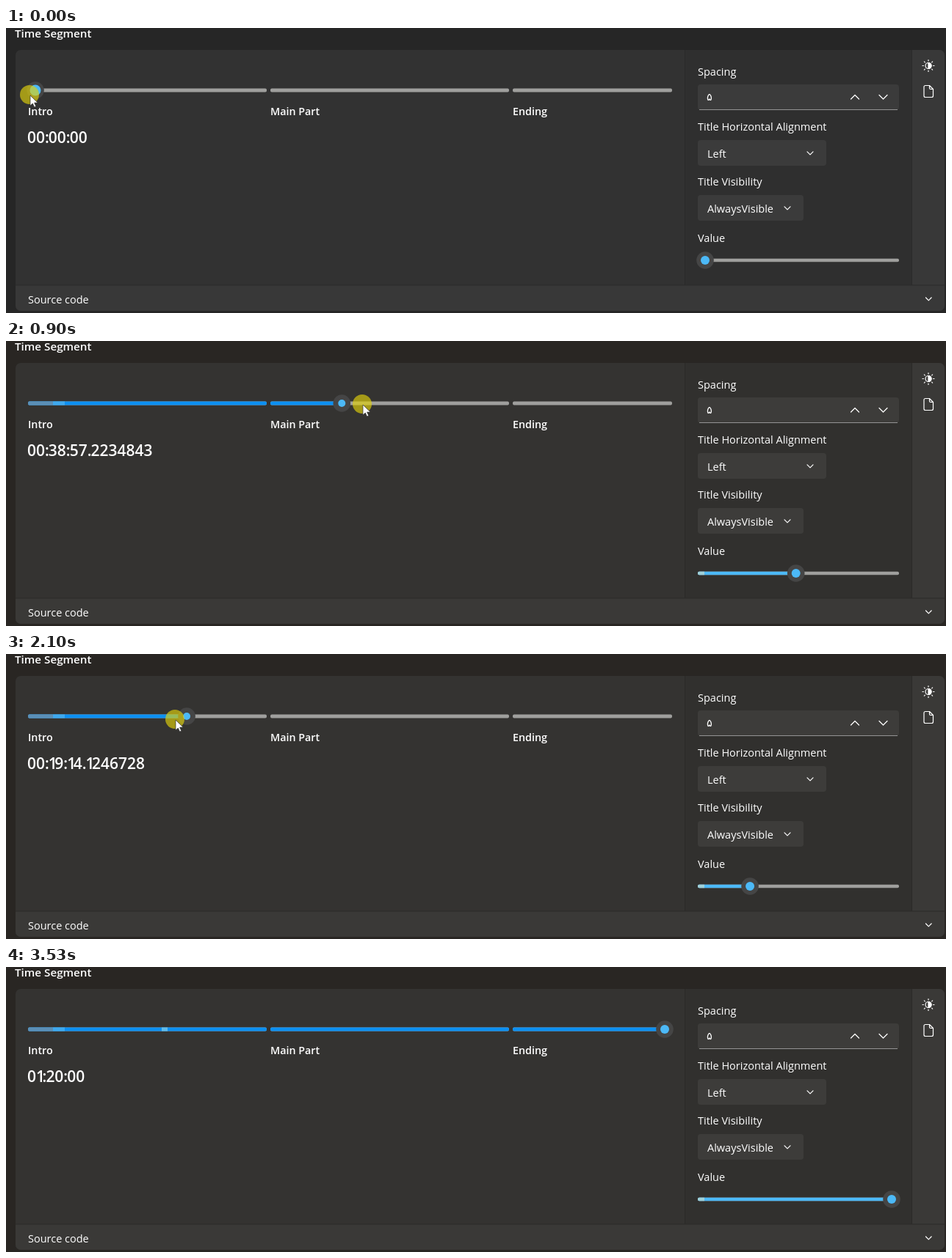
Recreate the animation shown at these times as an HTML page. Size 1280 px wide and 389 px high, loop 3.66 s.

```html
<!DOCTYPE html>
<html lang="en">
<head>
<meta charset="utf-8">
<title>Time Segment</title>
<style>
  html, body { margin: 0; width: 100%; height: 100%; overflow: hidden; background: #262626; }
  svg { display: block; width: 1280px; height: 389px; --bg: #262626; --card: #323232; --side: #2f2f2f; --strip: #383838; --box: #3b3b3b; --line: #2a2a2a; }
  svg.warm { --bg: #292623; --card: #343331; --side: #31302e; --strip: #3a3937; --box: #3d3c3a; --line: #2b2a28; }
  text { font: 14.5px "Open Sans", "Noto Sans", sans-serif; fill: #fff; white-space: pre; }
  .bold { font-weight: 600; font-size: 14.3px; }
  #clock { font-weight: 600; font-size: 21px; }
  .one { letter-spacing: -3.5px; }
  .dot { letter-spacing: -.9px; }
  .icon { fill: none; stroke: #fff; stroke-width: 1.2; stroke-linecap: round; stroke-linejoin: round; }
  .track { fill: #9f9f9d; }
  .ring { fill: #454545; }
  .accent { fill: #4cb9f7; }
</style>
</head>
<body>
<svg id="stage" viewBox="0 0 1280 389">
  <defs>
    <clipPath id="card"><rect x="13" y="30" width="1265" height="356" rx="7"/></clipPath>
    <clipPath id="bars">
      <rect x="30" y="82.6" width="325" height="4.8" rx="2"/>
      <rect x="360" y="82.6" width="325" height="4.8" rx="2"/>
      <rect x="690" y="82.6" width="217" height="4.8" rx="2"/>
    </clipPath>
    <clipPath id="valueBar"><rect x="942" y="314.8" width="274" height="4.4" rx="2"/></clipPath>
  </defs>

  <rect width="1280" height="389" fill="var(--bg)"/>
  <g clip-path="url(#card)">
    <rect x="13" y="30" width="1265" height="356" fill="var(--card)"/>
    <rect x="924" y="30" width="310" height="321" fill="var(--side)"/>
    <rect x="1234" y="30" width="44" height="321" fill="var(--strip)"/>
    <rect x="13" y="351" width="1265" height="35" fill="var(--strip)"/>
    <path d="M924.5 30V351M1233.5 30V351M13 351H1278" fill="none" stroke="var(--line)"/>
  </g>

  <text class="bold" x="12" y="12.5" style="font-size:15.2px">Time Segment</text>
  <text class="bold" x="30" y="119">Intro</text>
  <text class="bold" x="360" y="119">Main Part</text>
  <text class="bold" x="690" y="119">Ending</text>
  <text id="clock" x="29" y="157"></text>
  <text x="30" y="376">Source code</text>

  <g fill="var(--box)">
    <rect x="942" y="77" width="274" height="35" rx="4"/>
    <rect x="942" y="153" width="175" height="35" rx="4"/>
    <rect x="942" y="228" width="144" height="35" rx="4"/>
  </g>
  <path d="M944 111.5H1214" stroke="#949494"/>
  <text x="942" y="65">Spacing</text>
  <text x="954" y="99" style="font-family:'DejaVu Sans',sans-serif">۵</text>
  <text x="942" y="140">Title Horizontal Alignment</text>
  <text x="955" y="176.5">Left</text>
  <text x="942" y="215">Title Visibility</text>
  <text x="955" y="252">AlwaysVisible</text>
  <text x="942" y="292">Value</text>

  <g class="icon">
    <path d="M1150.5 97l5.5-5.5 5.5 5.5M1189 91.5l5.5 5.5 5.5-5.5M1091 168.8l4 4 4-4M1060 243.8l4 4 4-4M1252.5 368l3.8 3.8 3.8-3.8"/>
    <circle cx="1256" cy="51.5" r="4"/>
    <path d="M1256 47.5a4 4 0 0 1 0 8z" fill="#fff"/>
    <path id="rays"/>
    <path d="M1252 78.5h5.5l5 5v9a2 2 0 0 1-2 2h-8.500a2 2 0 0 1-2-2v-12a2 2 0 0 1 2-2zM1257.500 78.500v3.500a1.500 1.500 0 0 0 1.500 1.500h3.500"/>
  </g>

  <g clip-path="url(#bars)">
    <rect class="track" x="30" y="82" width="877" height="6"/>
    <rect id="fill" x="30" y="82" height="6" fill="#0c90f2"/>
    <g id="tints"></g>
  </g>
  <g clip-path="url(#valueBar)">
    <rect class="track" x="942" y="314" width="274" height="6"/>
    <rect id="valueFill" class="accent" x="942" y="314" height="6"/>
    <rect id="valueTint" x="942" y="314" width="9" height="6" fill="#9fd0d8"/>
  </g>
  <g id="thumb"><circle class="ring" r="11.8"/><circle id="dot" class="accent" r="5"/></g>
  <g id="valueThumb"><circle class="ring" r="11.8"/><circle class="accent" r="6"/></g>
  <g id="cursor">
    <circle r="13" fill="#e2d30b" fill-opacity=".65"/>
    <path d="M1 1v14l3.300-3 2.300 5 2.200-1-2.200-4.900h4.600z" fill="#fff" stroke="#333" stroke-width=".7"/>
  </g>
</svg>
<script>
const $ = id => document.getElementById(id);
const LOOP = 3660, TOTAL = 4800;

// bursts of redraws: first, last, count
const bursts = [[70, 550, 8], [620, 1110, 8], [1180, 1670, 8], [1740, 2240, 8], [2570, 2920, 6], [3250, 3530, 5]];
const stamps = [0];
for (const [a, b, n] of bursts)
  for (let i = 0; i < n; i++) stamps.push(Math.round((a + (b - a) * i / (n - 1)) / 10) * 10);

// time in ms, slider value in seconds
const valueKeys = [[0, 0], [550, 1105.8351171], [900, 2337.2234843], [1110, 2797], [1320, 3060],
  [1460, 3095.372069], [1670, 2646], [2100, 1154.1246728], [2240, 986], [2500, 986], [2920, TOTAL], [LOOP, TOTAL]];
const xKeys = [[0, 32], [550, 268], [900, 485], [1110, 560], [1320, 597], [1460, 585], [1670, 482],
  [2100, 230], [2240, 216], [2500, 216], [2850, 885], [2920, 897], [3180, 897], [3460, 865]];
const yKeys = [[0, 91], [550, 92], [900, 86], [1250, 82], [1460, 85], [2100, 89], [2500, 88], [2920, 86], [3180, 86], [3460, 24]];

// monotone cubic interpolation
function along(keys, t) {
  const last = keys.length - 1;
  if (t >= keys[last][0]) return keys[last][1];
  let i = 0;
  while (t >= keys[i + 1][0]) i++;
  const slope = j => (keys[j + 1][1] - keys[j][1]) / (keys[j + 1][0] - keys[j][0]);
  const tangent = j => {
    if (j === 0) return slope(0);
    if (j === last) return slope(last - 1);
    const a = slope(j - 1), b = slope(j);
    return a * b <= 0 ? 0 : 2 * a * b / (a + b);
  };
  const [t0, v0] = keys[i], [t1, v1] = keys[i + 1], h = t1 - t0, u = (t - t0) / h, w = 1 - u;
  return v0 * (1 + 2 * u) * w * w + h * tangent(i) * u * w * w
       + v1 * u * u * (3 - 2 * u) - h * tangent(i + 1) * u * u * w;
}

function clockText(v) {
  const ticks = Math.round(v * 1e7), sec = Math.floor(ticks / 1e7), rest = ticks % 1e7;
  const two = n => String(n).padStart(2, '0');
  const text = [sec / 3600, sec / 60 % 60, sec % 60].map(n => two(Math.floor(n))).join(':');
  return rest ? text + '.' + String(rest).padStart(7, '0') : text;
}

// x, width, colour, visible from
const tints = [[30, 34, '#5b8fb6', 70], [64, 16, '#3fa9ee', 70], [212, 8, '#62bbe8', 2570]].map(([x, w, fill, from]) => {
  const el = document.createElementNS('http://www.w3.org/2000/svg', 'rect');
  for (const [k, v] of Object.entries({ x, y: 82, height: 6, fill })) el.setAttribute(k, v);
  $('tints').append(el);
  return { el, x, w, from };
});

let rays = '';
for (let i = 0; i < 8; i++) {
  const c = Math.cos(i * Math.PI / 4), s = Math.sin(i * Math.PI / 4);
  rays += `M${1256 + 6.6 * c} ${51.5 + 6.6 * s}L${1256 + 8 * c} ${51.5 + 8 * s}`;
}
$('rays').setAttribute('d', rays);

const move = (id, x, y) => $(id).setAttribute('transform', `translate(${x} ${y})`);
const size = (el, w) => el.setAttribute('width', Math.max(0, w));
let shown = -1;

function draw(t) {
  if (t === shown) return;
  shown = t;
  const v = along(valueKeys, t), x = 40 + 857 * v / TOTAL, vx = 952 + 254 * v / TOTAL;
  $('stage').classList.toggle('warm', t > 0);
  size($('fill'), x - 30);
  size($('valueFill'), vx - 942);
  size($('valueTint'), t > 0 ? 9 : 0);
  for (const p of tints) size(p.el, t < p.from ? 0 : Math.min(p.w, x - p.x));
  move('thumb', x, 85);
  move('valueThumb', vx, 317);
  $('dot').setAttribute('r', t === 0 ? 7.5 : t < 3250 ? 5 : 6);
  move('cursor', along(xKeys, t), along(yKeys, t));
  $('cursor').setAttribute('visibility', t < 3530 ? 'visible' : 'hidden');
  $('clock').innerHTML = clockText(v).replace(/[1:.]/g, c => `<tspan class="${c === '1' ? 'one' : 'dot'}">${c}</tspan>`);
}

const start = performance.now();
function tick(now) {
  const t = Math.max(0, now - start) % LOOP;
  draw(stamps.filter(s => s <= t).pop());
  requestAnimationFrame(tick);
}
draw(0);
requestAnimationFrame(tick);
</script>
</body>
</html>
```
